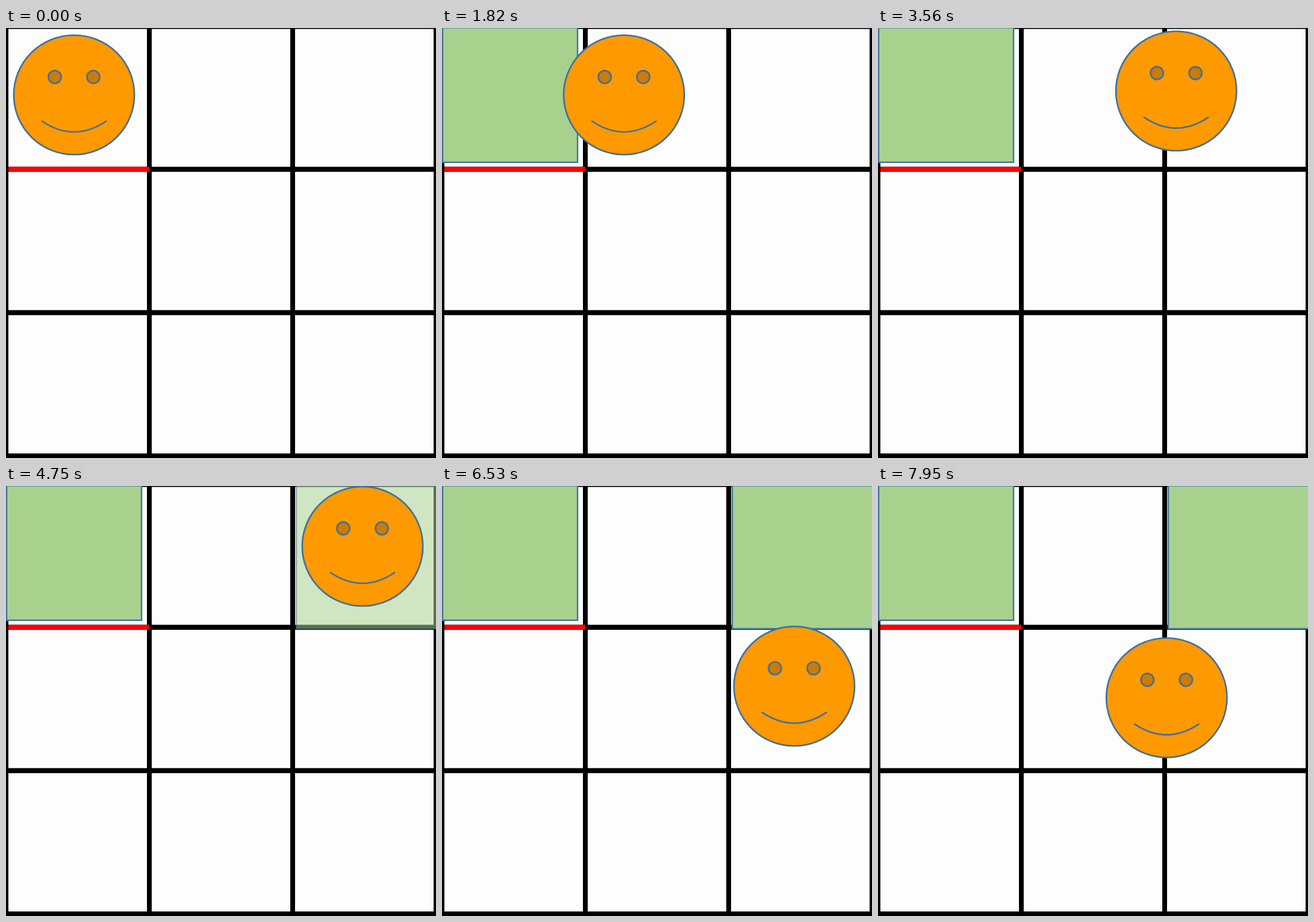
An HTML page with a canvas that plays this animation: 720x720 px, repeating every 7990 ms.

```html
<!DOCTYPE html>
<html lang="en">
<head>
<meta charset="utf-8">
<title>Smiley on a grid</title>
<style>
  html, body { margin: 0; width: 100%; height: 100%; overflow: hidden; background: #000; }
  canvas { display: block; width: 720px; height: 720px; }
</style>
</head>
<body>
<canvas id="stage" width="720" height="720"></canvas>
<script>
const ctx = document.getElementById('stage').getContext('2d');
const LOOP = 7990;
const PAPER = '#fdfdfd', GREEN = '#a9d18e', ORANGE = '#ff9900', EYE = '#cd7b00';
const EDGE = '#41719c';

// Each leg starts where the one before it ended.
const START = { x: 114, y: 112 };
const LEGS = [
  { at: 580, dur: 1860, x: 359, y: 112 },
  { at: 2467, dur: 2000, x: 597, y: 101 },
  { at: 4984, dur: 2000, x: 589, y: 362 },
  { at: 6984, dur: 2000, x: 363, y: 346 }
];

const clamp = v => Math.min(1, Math.max(0, v));
const progress = (t, at, dur) => clamp((t - at) / dur);
const ease = p => p < 0.5 ? 2 * p * p : 1 - 2 * (1 - p) * (1 - p);

function facePosition(t) {
  let { x, y } = START;
  for (const leg of LEGS) {
    const s = ease(progress(t, leg.at, leg.dur));
    x += (leg.x - x) * s;
    y += (leg.y - y) * s;
  }
  return { x, y };
}

function drawGrid() {
  ctx.fillStyle = '#000';
  ctx.fillRect(0, 0, 720, 720);
  ctx.fillStyle = PAPER;
  for (let row = 0; row < 3; row++) {
    const top = row ? row * 240 + 0.8 : 1.6;
    for (let col = 0; col < 3; col++) {
      ctx.fillRect(col * 240 + 4, top, 232, row * 240 + 232.4 - top);
    }
  }
  ctx.fillStyle = '#f00';
  ctx.fillRect(4, 232.4, 236, 8.4);
}

function drawTile(x, y, w, h, alpha) {
  if (!alpha) return;
  ctx.globalAlpha = alpha;
  ctx.fillStyle = GREEN;
  ctx.fillRect(x, y, w, h);
  ctx.strokeStyle = EDGE;
  ctx.lineWidth = 2.4;
  ctx.strokeRect(x, y, w, h);
  ctx.globalAlpha = 1;
}

function disc(x, y, rx, ry, fill) {
  ctx.beginPath();
  ctx.ellipse(x, y, rx, ry, 0, 0, Math.PI * 2);
  ctx.fillStyle = fill;
  ctx.fill();
  ctx.stroke();
}

function drawFace({ x, y }) {
  ctx.save();
  ctx.translate(x, y);
  ctx.strokeStyle = EDGE;
  ctx.lineWidth = 2.7;
  disc(0, 0, 101, 100, ORANGE);
  disc(-32.3, -30, 10.7, 10.7, EYE);
  disc(32.3, -30, 10.7, 10.7, EYE);
  ctx.beginPath();
  ctx.moveTo(-54.5, 43.5);
  ctx.quadraticCurveTo(0, 80.5, 54.5, 43.5);
  ctx.stroke();
  ctx.restore();
}

function draw(t) {
  drawGrid();
  drawTile(1, -0.5, 226, 225.3, progress(t, 30, 520));
  drawTile(486, -0.5, 238, 239.5, progress(t, 4484, 500));
  drawFace(facePosition(t));
}

function tick() {
  draw(performance.now() % LOOP);
  requestAnimationFrame(tick);
}
tick();
</script>
</body>
</html>
```
